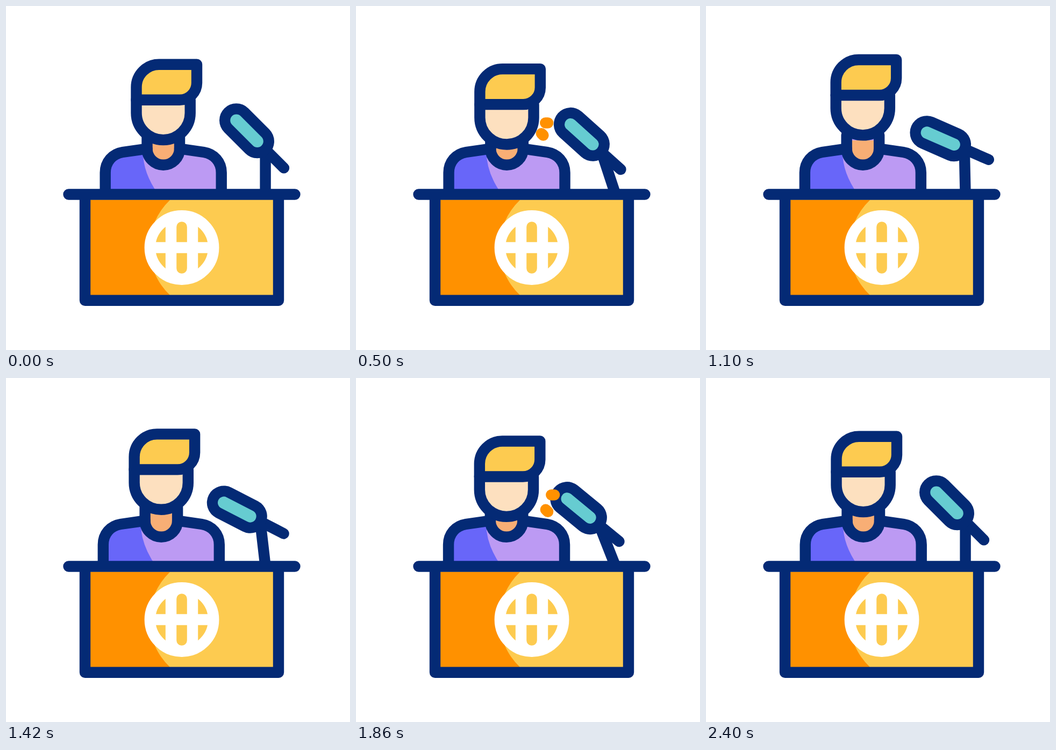
Recreate the animation shown at these times as an HTML page. Size 640 by 640 pixels, loop 2.42 s.

```html
<!DOCTYPE html>
<html>
<head>
<meta charset="utf-8">
<style>
  html, body { margin: 0; width: 100%; height: 100%; overflow: hidden; background: #fff; }
  svg { display: block; width: 100%; height: 100%; }
  .ink { stroke: #042a75; stroke-width: 20.4; stroke-linecap: round; stroke-linejoin: round; }
  .globe { stroke: #fff; stroke-width: 20.4; }
  .voice { stroke: #ff9100; stroke-width: 20.6; stroke-linecap: round; }
</style>
</head>
<body>
<svg viewBox="0 0 640 640" fill="none">
  <g id="body">
    <path fill="#bc9af3" d="M184.7 350V310C184.7 290 198 275 217 272L262.5 265.5V240H323V265.5L368 272C387 275 400.7 290 400.7 310V350Z"/>
    <path fill="#6866f9" d="M184.7 350V310C184.7 290 198 275 217 272L255 266Q253 308 283 350Z"/>
    <path fill="#f8ae75" d="M262.5 250V265.5A30.2 30.2 0 0 0 323 265.5V250Z"/>
    <path class="ink" d="M184.7 350V310C184.7 290 198 275 217 272L262.5 265.5M323 265.5L368 272C387 275 400.7 290 400.7 310V350"/>
    <path class="ink" d="M262.5 240V265.5A30.2 30.2 0 0 0 323 265.5V240"/>
    <g id="head">
      <path class="ink" fill="#fde0bf" d="M242.5 174.7V199A50.1 50.1 0 0 0 342.7 199V174.7"/>
      <path class="ink" fill="#fdcb50" d="M242.5 174.7V151A42.3 42.3 0 0 1 284.8 108.7H355V143A31.7 31.7 0 0 1 323.3 174.7Z"/>
    </g>
  </g>
  <g id="stand">
    <path class="ink" d="M482.6 350V272"/>
    <g id="mic">
      <path class="ink" d="M481 265.4L517 301.4"/>
      <path class="ink" style="stroke-width:63" d="M428.5 212.7L467.5 251.8"/>
      <path stroke="#66ccd1" stroke-width="22.6" stroke-linecap="round" d="M428.5 212.7L467.5 251.8"/>
    </g>
  </g>
  <path class="voice"/>
  <path class="voice"/>
  <path fill="#fdcb50" d="M147 350.5H507V548H147Z"/>
  <path fill="#ff9100" d="M147 361H305A122 122 0 0 0 305 538V548H147Z"/>
  <path class="ink" d="M147 350.5H507V547.8H147ZM116.5 350.5H537.5"/>
  <g class="globe">
    <circle cx="327" cy="449.5" r="59.2" fill="#fdcb50"/>
    <rect x="307" y="391" width="40" height="117" rx="20"/>
    <path d="M270 449.5H384"/>
  </g>
</svg>
<script>
  const LOOP = 2420, BEAT = 600;
  const byId = id => document.getElementById(id);
  const body = byId('body'), head = byId('head'), stand = byId('stand'), mic = byId('mic');
  const voices = document.querySelectorAll('.voice');
  const voiceLines = [[352.4, 217.5, 369, 217.5], [345, 237.3, 357, 248.8]];

  const ease = p => (1 - Math.cos(Math.PI * Math.min(1, Math.max(0, p)))) / 2;
  const mix = (a, b, p) => a + (b - a) * p;

  // Eased value through keys spaced one beat apart
  function track(t, ...keys) {
    const i = Math.min(3, Math.floor(t / BEAT));
    return mix(keys[i], keys[i + 1], ease(t / BEAT - i));
  }

  function drawVoice(el, [x1, y1, x2, y2], from, to) {
    const point = p => mix(x1, x2, p) + ' ' + mix(y1, y2, p);
    el.setAttribute('d', to - from > 0.01 ? `M${point(from)}L${point(to)}` : '');
  }

  function draw(t) {
    const set = (el, value) => el.setAttribute('transform', value);
    set(body, `translate(${track(t, 0, -13, 0, -13, 0)} 0)`);
    set(head, `translate(0 ${track(t, 0, 9, -10, 9, 0)})`);
    set(stand, `rotate(${track(t, 0, -19.5, 0, -22, 0)} 482.6 350)`);
    set(mic, `rotate(${track(t, 0, 16.2, -22.8, 16.2, 0)} 481 265.4)`);
    const phase = t % (2 * BEAT);
    const to = ease((phase - 430) / 200), from = ease((phase - 540) / 200);
    voices.forEach((el, i) => drawVoice(el, voiceLines[i], from, to));
  }

  const start = performance.now();
  function frame() {
    const t = (performance.now() - start) % LOOP;
    draw(Math.min(t, 4 * BEAT));
    requestAnimationFrame(frame);
  }
  frame();
</script>
</body>
</html>
```
